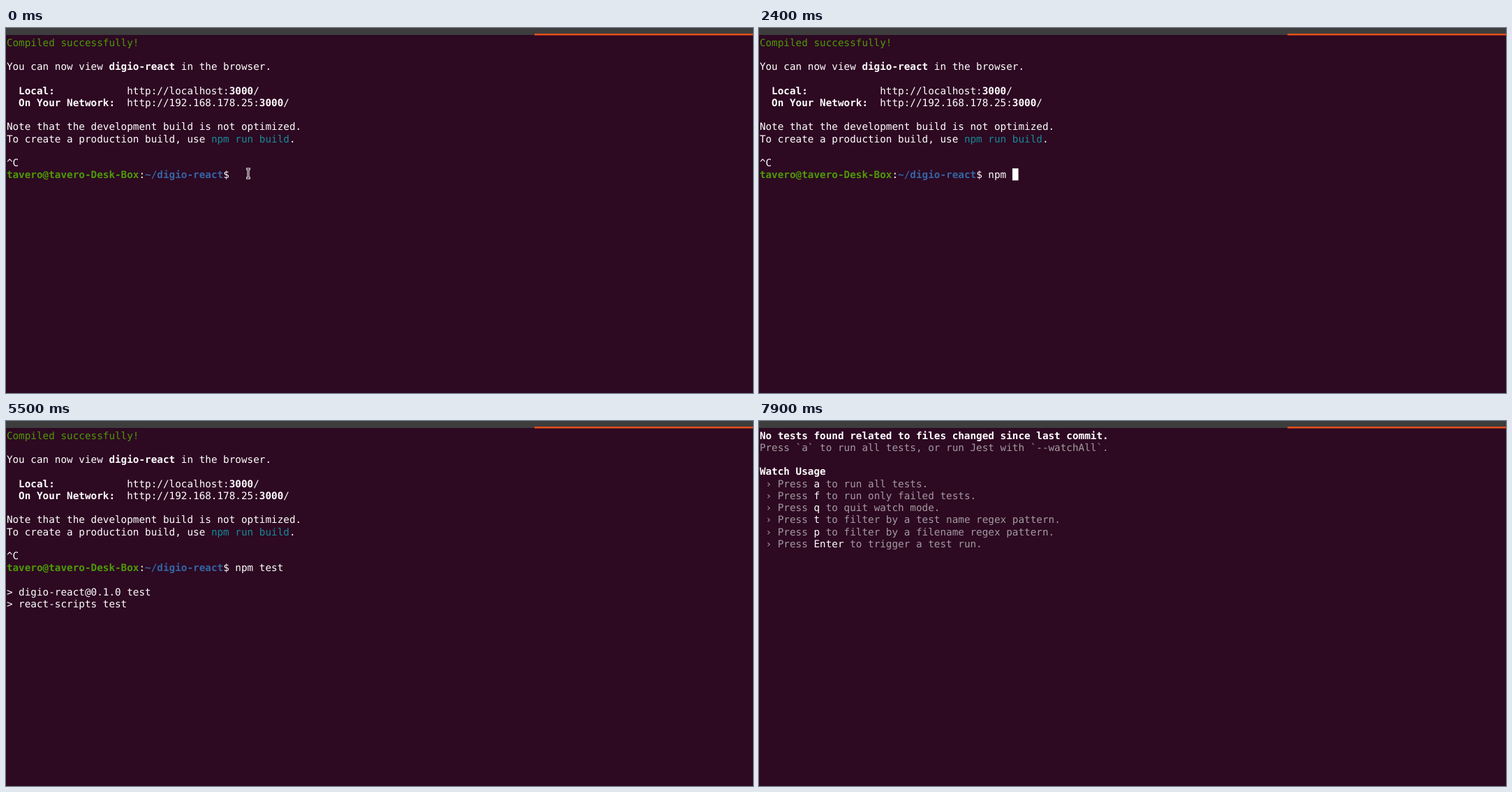
Recreate the animation shown at these times as an HTML page. Size 1070 by 523 pixels, loop 8000 ms.

```html
<!DOCTYPE html>
<html lang="en">
<head>
<meta charset="utf-8">
<title>Terminal</title>
<style>
  html, body { margin: 0; width: 100%; height: 100%; overflow: hidden; background: #2d0922; }
  svg { display: block; width: 1070px; height: 523px; }
  text {
    font: 14.32px "DejaVu Sans Mono", monospace;
    text-rendering: geometricPrecision;
    font-variant-ligatures: none;
    white-space: pre;
    fill: #fff;
  }
  .bold, .user, .path { font-weight: bold; }
  .green, .user { fill: #4e9a06; }
  .path { fill: #3465a4; }
  .teal { fill: #168a98; }
  .dim { fill: #a39aa0; }
</style>
</head>
<body>
<svg viewBox="0 0 1070 523">
  <rect width="1070" height="523" fill="#2d0922"/>
  <rect width="1070" height="10" fill="#3d3d3d"/>
  <rect x="757" y="8" width="313" height="2.6" fill="#e04e1a"/>
  <g id="shell"></g>
  <g id="output"></g>
  <g id="watch"></g>
  <rect id="cursor" fill="#fff"/>
  <g id="pointer" fill="none">
    <path d="M344 202H350M344 215H350M347 202V215" stroke="#fff" stroke-width="3"/>
    <path d="M344.5 202H349.5M344.5 215H349.5M347 202V215" stroke="#140510"/>
  </g>
</svg>
<script>
const LOOP = 8000;
const CELL = { x: 0.9, y: 11.4, w: 8.62, h: 17.25 };
const PROMPT_ROW = 11, PROMPT_COL = 38;
const $ = id => document.getElementById(id);

function svg(tag, parent, attrs, content = "") {
  const node = document.createElementNS("http://www.w3.org/2000/svg", tag);
  for (const key in attrs) node.setAttribute(key, attrs[key]);
  node.textContent = content;
  return parent.appendChild(node);
}

// A line is a list of plain strings and [style, text] pairs.
function line(group, row, ...parts) {
  const text = svg("text", group, { x: CELL.x, y: CELL.y + row * CELL.h + 14.1 });
  for (const part of parts) {
    const [style, words] = Array.isArray(part) ? part : ["", part];
    svg("tspan", text, { class: style }, words);
  }
  return text;
}

const shell = $("shell"), output = $("output"), watch = $("watch");
line(shell, 0, ["green", "Compiled successfully!"]);
line(shell, 2, "You can now view ", ["bold", "digio-react"], " in the browser.");
line(shell, 4, ["bold", "  Local:            "], "http://localhost:", ["bold", "3000"], "/");
line(shell, 5, ["bold", "  On Your Network:  "], "http://192.168.178.25:", ["bold", "3000"], "/");
line(shell, 7, "Note that the development build is not optimized.");
line(shell, 8, "To create a production build, use ", ["teal", "npm run build"], ".");
line(shell, 10, "^C");
const prompt = line(shell, PROMPT_ROW,
  ["user", "tavero@tavero-Desk-Box"], ":", ["path", "~/digio-react"], "$ ", "");
const command = prompt.lastChild;

line(output, 13, "> digio-react@0.1.0 test");
line(output, 14, "> react-scripts test");

line(watch, 0, ["bold", "No tests found related to files changed since last commit."]);
line(watch, 1, ["dim", "Press `a` to run all tests, or run Jest with `--watchAll`."]);
line(watch, 3, ["bold", "Watch Usage"]);
[
  ["a", "run all tests."],
  ["f", "run only failed tests."],
  ["q", "quit watch mode."],
  ["t", "filter by a test name regex pattern."],
  ["p", "filter by a filename regex pattern."],
  ["Enter", "trigger a test run."]
].forEach(([key, action], i) =>
  line(watch, 4 + i, ["dim", " › Press "], key, ["dim", " to " + action]));

const COMMAND = "npm test";
const KEY_TIMES = [1400, 1700, 2200, 2400, 3100, 3300, 3800, 3800];
const ENTER = 4900, RUN = 5100, WATCH = 7100;
const CURSOR_SPANS = [[200, 800], [1400, 3000], [3100, 4400], [4900, 5500], [6100, 6700], [7300, 7900]];

const show = (node, on) => node.setAttribute("visibility", on ? "visible" : "hidden");

function render(t) {
  const typed = KEY_TIMES.filter(time => t >= time).length;
  command.textContent = COMMAND.slice(0, typed);
  show(shell, t < WATCH);
  show(output, t >= RUN && t < WATCH);
  show(watch, t >= WATCH);
  show($("pointer"), t < KEY_TIMES[0]);

  const row = t < ENTER ? PROMPT_ROW : t < RUN ? 12 : t < WATCH ? 16 : 10;
  const col = t < ENTER ? PROMPT_COL + typed : 0;
  const cursor = $("cursor");
  cursor.setAttribute("x", CELL.x + col * CELL.w);
  cursor.setAttribute("y", CELL.y + row * CELL.h);
  cursor.setAttribute("width", CELL.w);
  cursor.setAttribute("height", CELL.h);
  show(cursor, CURSOR_SPANS.some(([on, off]) => t >= on && t < off));
}

const start = performance.now();
function tick(now) {
  render(Math.max(0, now - start) % LOOP);
  requestAnimationFrame(tick);
}
render(0);
requestAnimationFrame(tick);
</script>
</body>
</html>
```
